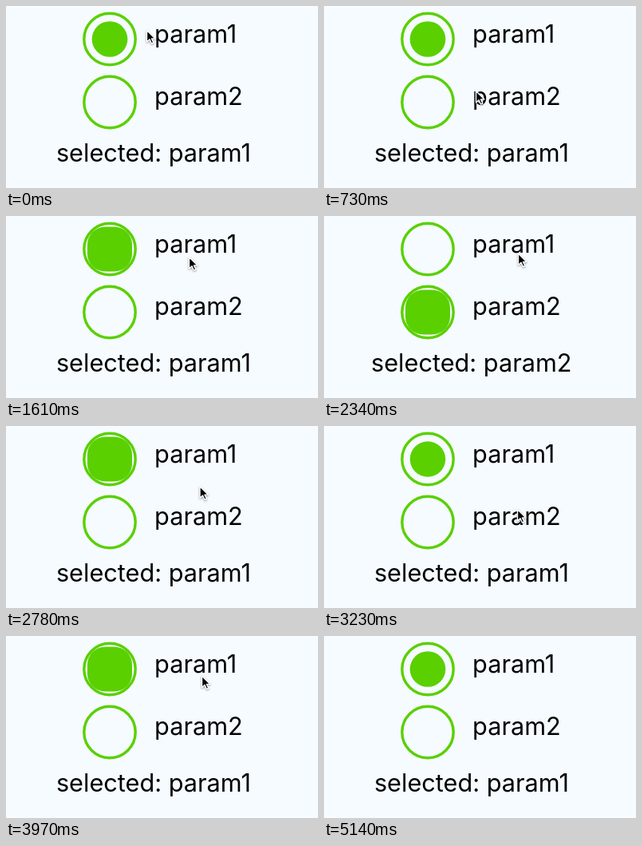
An HTML page that plays this animation: 391x228 px, repeating every 5.44 s.

```html
<!DOCTYPE html>
<html lang="en">
<head>
<meta charset="utf-8">
<title>Radio buttons</title>
<style>
  html, body { margin: 0; width: 100%; height: 100%; overflow: hidden; background: #f5fbff; }
  svg { display: block; width: 391px; height: 228px; }
  text { font: 400 30.7px Inter, "Liberation Sans", sans-serif; fill: #000; white-space: pre; }
  .ring { fill: none; stroke: #5ad000; stroke-width: 3.4; }
  .dot { fill: #5ad000; }
  .arrow {
    fill: #000; stroke: #fff; stroke-width: 1.4; stroke-linejoin: round;
    filter: drop-shadow(0 1px 1px rgba(0, 0, 0, .4));
  }
</style>
</head>
<body>
<svg viewBox="0 0 391 228">
  <circle class="ring" cx="130" cy="41.5" r="32.2"/>
  <circle class="ring" cx="130" cy="120.5" r="32.2"/>
  <rect class="dot" id="dot"/>
  <text x="186.1" y="45.6">param1</text>
  <text x="186.1" y="124.4">param2</text>
  <text id="status" y="195"></text>
  <path class="arrow" id="arrow" d="M.5 .5V15L4 11.7L6.4 17L8.9 16L6.5 10.9H11Z"/>
</svg>
<script>
const LOOP = 5440;
const TICK = LOOP / 37; // the picture only changes on these steps
const LEAD = 13;
const LAST_TICK = 35;
const DOT = 44.7;

// Ticks at which the selection toggles, starting from the first option
const toggles = [6, 10, 15, 18, 23, 26];

// Places the pointer visits: [tick, x, y]
const stops = [
  [0, 176, 30], [5, 190, 106], [11, 229, 51], [14, 239, 104], [16, 243, 46.5],
  [22, 242, 104], [27, 245, 49.5], [32, 331, 198], [33, 351, 212], [34, 244, 216]
];

const $ = id => document.getElementById(id);
const set = (el, attrs) => {
  for (const key in attrs) el.setAttribute(key, attrs[key]);
};
const mix = (a, b, u) => a + (b - a) * u;
const ease = u => u * u * u * (u * (6 * u - 15) + 10);

// Underdamped spring from 0 to 1, overshooting to about 1.26
function spring(ms) {
  const s = ms / 1000;
  return 1 - Math.exp(-9.7 * s) * (Math.cos(22.6 * s) + 0.43 * Math.sin(22.6 * s));
}

function pointer(tick) {
  const i = stops.findIndex(stop => stop[0] > tick);
  if (i < 0) return stops[stops.length - 1].slice(1);
  const [t0, x0, y0] = stops[i - 1], [t1, x1, y1] = stops[i];
  const u = ease((tick - t0) / (t1 - t0));
  return [mix(x0, x1, u), mix(y0, y1, u)];
}

function draw(time) {
  const tick = Math.min(LAST_TICK, Math.floor((time + LEAD) / TICK));
  const past = toggles.filter(t => t <= tick);
  const option = past.length % 2;
  const size = past.length ? DOT * spring((tick - past[past.length - 1]) * TICK) : DOT;
  set($("dot"), {
    x: 130 - size / 2, y: 41.5 + 79 * option - size / 2,
    width: size, height: size, rx: Math.min(DOT, size) / 2
  });

  $("status").textContent = "selected: param" + (option + 1);
  set($("status"), { x: 62.9 - 3.9 * option });

  set($("arrow"), {
    visibility: tick < LAST_TICK ? "visible" : "hidden",
    transform: `translate(${pointer(tick)})`
  });
}

const begin = performance.now();
function loop() {
  draw((performance.now() - begin) % LOOP);
  requestAnimationFrame(loop);
}
loop();
</script>
</body>
</html>
```
